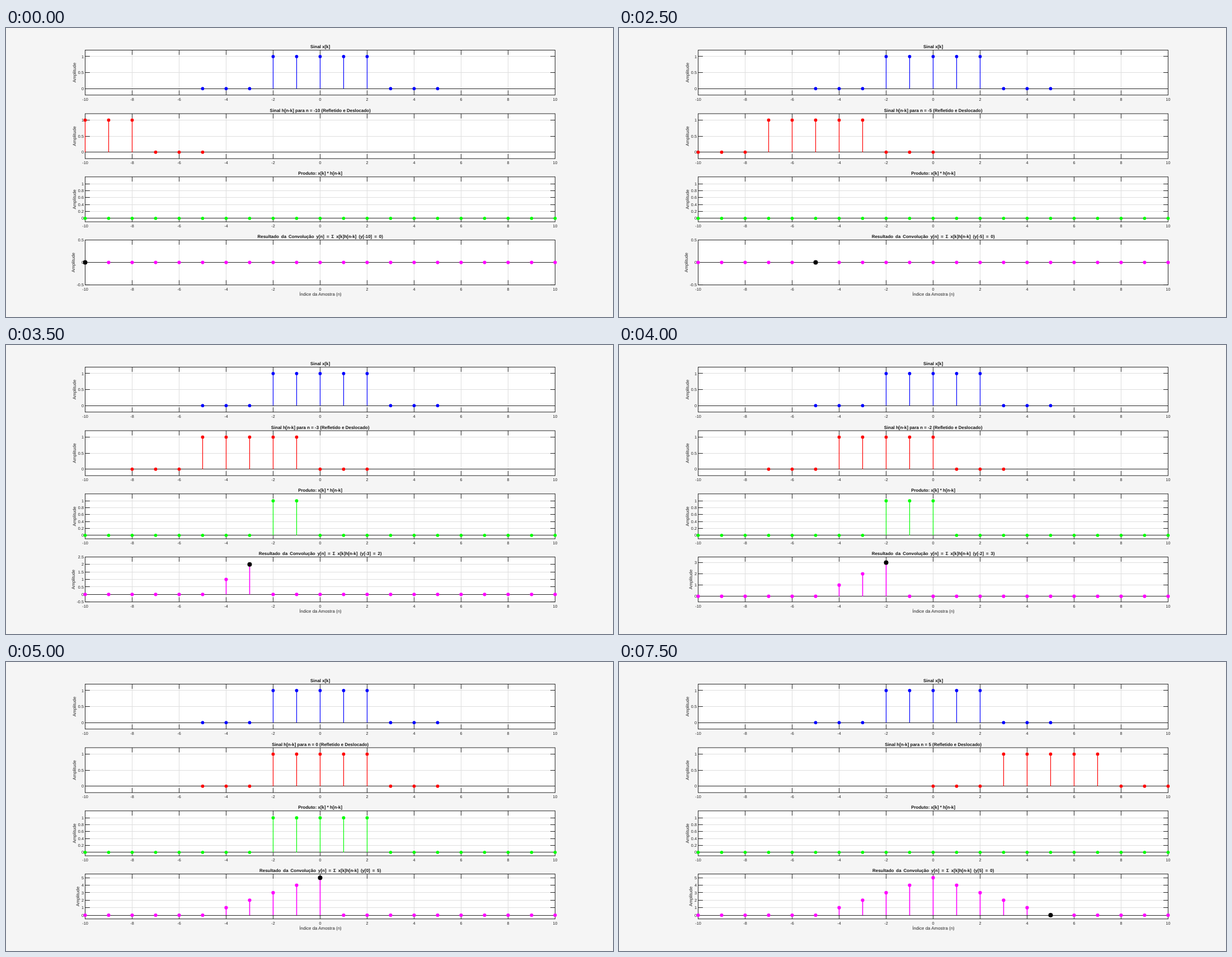
An HTML page that plays this animation: 1085 by 516 pixels, repeating every 8000 ms.

```html
<!DOCTYPE html>
<html lang="pt">
<head>
<meta charset="utf-8">
<title>Convolução discreta</title>
<style>
  html, body { margin: 0; width: 100%; height: 100%; overflow: hidden; background: #f5f5f5; }
  svg { display: block; width: 100%; height: 100%; }
  text { font-family: "Liberation Sans", Arial, sans-serif; fill: #262626; text-rendering: geometricPrecision; }
  .tick { font-size: 7.3px; }
  .label { font-size: 7.95px; }
  .title { font-size: 7.95px; font-weight: bold; fill: #141414; }
</style>
</head>
<body>
<svg id="stage" viewBox="0 0 1085 516"></svg>
<script>
const STEP = 500, STEPS = 16, FIRST = -10;
const LEFT = 141.5, UNIT = 42, WIDTH = 840, HEIGHT = 80.2, TICK = 8.4;
const TOPS = [39.5, 153, 265.8, 378.5];
const INK = '#262626', GRID = '#dedede';
const stage = document.getElementById('stage');

const range = (a, b, step = 1) =>
  Array.from({ length: Math.round((b - a) / step) + 1 }, (_, i) => a + i * step);
const snap = v => Math.floor(v) + 0.5;
const xOf = k => LEFT + (k + 10) * UNIT;
const pulse = k => Math.abs(k) <= 2 ? 1 : 0;
const conv = n => Math.max(0, 5 - Math.abs(n));

const line = (x1, y1, x2, y2, color, width = 1) =>
  `<path d="M${x1} ${y1}L${x2} ${y2}" stroke="${color}" stroke-width="${width}"/>`;
const dot = (x, y, r, color) => `<circle cx="${x}" cy="${y}" r="${r}" fill="${color}"/>`;
const text = (x, y, cls, str, anchor = 'middle', extra = '') =>
  `<text x="${x}" y="${y}" class="${cls}" text-anchor="${anchor}" ${extra}>${str}</text>`;

function panel(row, o) {
  const top = TOPS[row], bottom = top + HEIGHT, right = LEFT + WIDTH;
  const yOf = v => bottom - (v - o.lo) / (o.hi - o.lo) * HEIGHT;
  const xs = range(-10, 10, 2), zero = yOf(0);
  const box = paint => `<rect x="${LEFT}" y="${top}" width="${WIDTH}" height="${HEIGHT}" ${paint}/>`;
  let s = box('fill="#fff"');

  for (const k of xs) s += line(xOf(k), top, xOf(k), bottom, GRID);
  for (const v of o.ticks) s += line(LEFT, snap(yOf(v)), right, snap(yOf(v)), GRID);

  for (const k of xs) {
    const x = xOf(k);
    s += line(x, top, x, top + TICK, INK) + line(x, bottom, x, bottom - TICK, INK);
    s += text(x, bottom + 9.8, 'tick', k);
  }
  for (const v of o.ticks) {
    const y = snap(yOf(v));
    s += line(LEFT, y, LEFT + TICK, y, INK) + line(right, y, right - TICK, y, INK);
    s += text(139, yOf(v) + 2.6, 'tick', +v.toFixed(1), 'end');
  }
  s += box(`fill="none" stroke="${INK}"`);
  s += line(LEFT, snap(zero), right, snap(zero), INK);

  for (const [k, v] of o.data)
    if (v) s += line(xOf(k), zero, xOf(k), yOf(v), o.color, o.stem || 1.2);
  for (const [k, v] of o.data) s += dot(xOf(k), yOf(v), o.radius || 2.9, o.color);
  if (o.mark) s += dot(xOf(o.mark[0]), yOf(o.mark[1]), 4, '#000');

  s += text(561.7, top - 3.4, 'title', o.title, 'middle', o.attrs);
  const lx = o.labelX || 125.2, ly = top + HEIGHT / 2;
  return s + text(lx, ly, 'label', 'Amplitude', 'middle', `transform="rotate(-90 ${lx} ${ly})"`);
}

function draw(n) {
  const all = range(-10, 10);
  const max = Math.max(...range(FIRST, n).map(conv));
  const fine = max < 3;
  stage.innerHTML = '<rect width="1085" height="516" fill="#f5f5f5"/>' +
    panel(0, {
      lo: -0.2, hi: 1.2, ticks: [0, 0.5, 1], color: '#00f', title: 'Sinal x[k]',
      data: range(-5, 5).map(k => [k, pulse(k)])
    }) +
    panel(1, {
      lo: -0.2, hi: 1.2, ticks: [0, 0.5, 1], color: '#f00',
      title: `Sinal h[n-k] para n = ${n} (Refletido e Deslocado)`,
      data: range(Math.max(-10, n - 5), Math.min(10, n + 5)).map(k => [k, pulse(n - k)])
    }) +
    panel(2, {
      lo: -0.1, hi: 1.2, ticks: range(0, 1, 0.2), color: '#0f0', title: 'Produto: x[k] * h[n-k]',
      data: all.map(k => [k, pulse(k) * pulse(n - k)])
    }) +
    panel(3, {
      lo: -0.5, hi: max + 0.5, ticks: fine ? range(-0.5, max + 0.5, 0.5) : range(0, max),
      color: '#f0f', stem: 1.6, radius: 3.1, labelX: fine ? 122.8 : 131.2,
      title: `Resultado da Convolução y[n] = Σ x[k]h[n-k] (y[${n}] = ${conv(n)})`,
      attrs: 'style="word-spacing:1.76px"',
      data: all.map(k => [k, k <= n ? conv(k) : 0]), mark: [n, conv(n)]
    }) +
    text(562, 478, 'label', 'Índice da Amostra (n)');
}

let shown = null;
const start = performance.now();
function tick(now) {
  const n = FIRST + Math.floor(Math.max(0, now - start) / STEP) % STEPS;
  if (n !== shown) draw(shown = n);
  requestAnimationFrame(tick);
}
tick(start);
</script>
</body>
</html>
```
